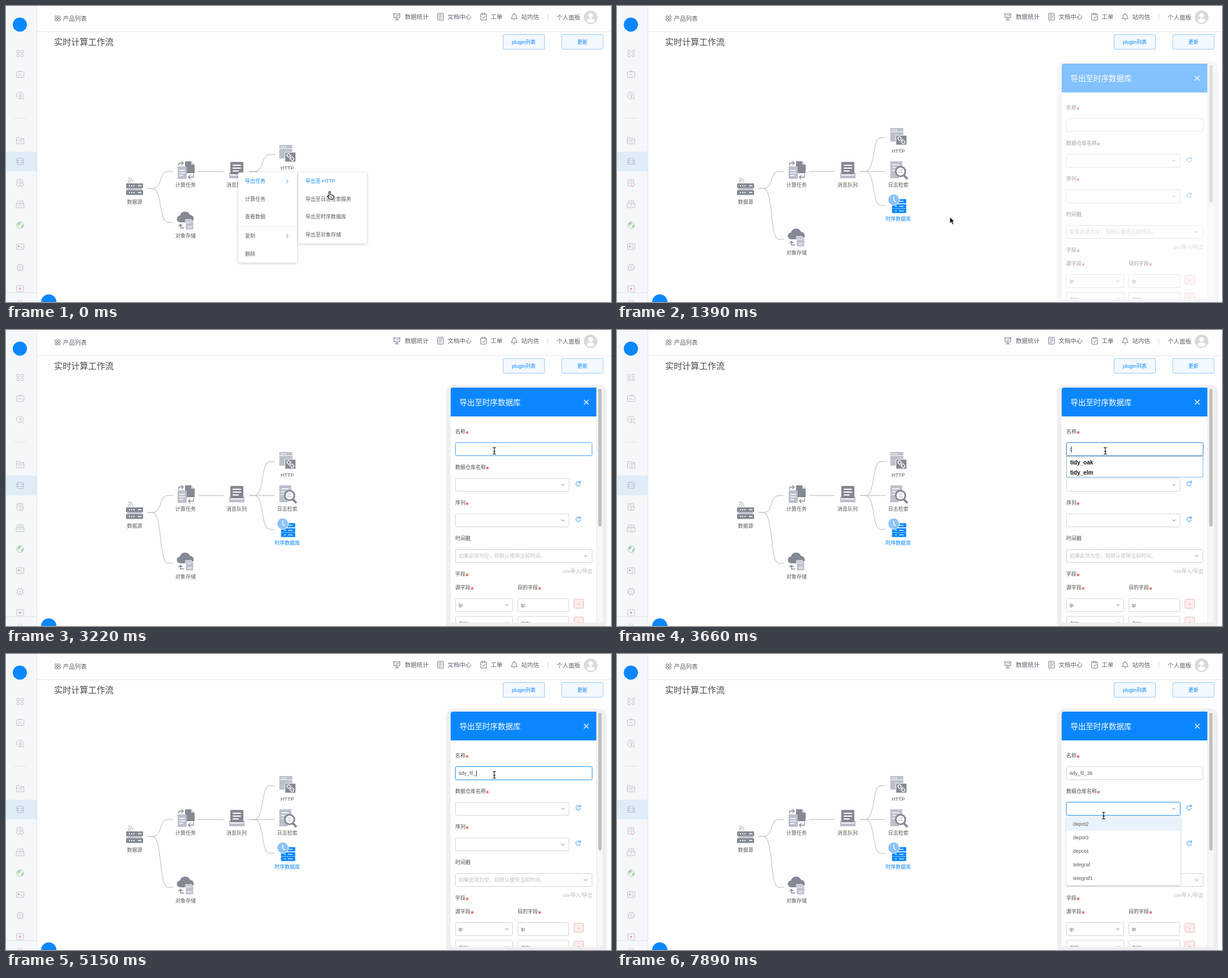
An HTML page for the animation above (8000 ms loop, 1068 by 524 pixels).

```html
<!DOCTYPE html>
<html lang="zh-CN">
<head>
<meta charset="utf-8">
<title>实时计算工作流</title>
<style>
html, body { margin: 0; width: 100%; height: 100%; overflow: hidden; background: #fefefe; }
svg { display: block; width: 100vw; height: 100vh; }
text { font-family: "Liberation Sans", "Noto Sans CJK SC", "Noto Sans CJK", sans-serif; white-space: pre; }
.pop { filter: drop-shadow(0 1px 2px rgba(0, 0, 0, .22)); }
.line { fill: none; stroke-linecap: round; stroke-linejoin: round; }
</style>
</head>
<body>
<svg id="stage" viewBox="0 0 1068 524"></svg>
<script>
const DARK = '#858993', LIGHT = '#bcc0cc', BLUE = '#0a87ff', HOVER = '#1b8fe8', ORANGE = '#eab596';
const NAME = 'tidy_fil_36';
const KEYS = [3520, 3670, 3820, 3960, 4260, 4560, 4700, 4850, 5150, 6050, 6200];
const $ = id => document.getElementById(id);

const text = (x, y, s, size = 9, fill = '#5c5c5c', extra = '') =>
  `<text x="${x}" y="${y + size * .36}" font-size="${size}" fill="${fill}" ${extra}>${s}</text>`;
const mid = (x, y, s, size, fill, extra = '') => text(x, y, s, size, fill, 'text-anchor="middle" ' + extra);
const rect = (x, y, w, h, fill, extra = '') =>
  `<rect x="${x}" y="${y}" width="${w}" height="${h}" fill="${fill}" ${extra}/>`;
const circle = (x, y, r, fill, extra = '') => `<circle cx="${x}" cy="${y}" r="${r}" fill="${fill}" ${extra}/>`;
const line = (d, stroke, w = 1) => `<path class="line" d="${d}" stroke="${stroke}" stroke-width="${w}"/>`;
const shape = (d, fill, extra = '') => `<path d="${d}" fill="${fill}" ${extra}/>`;
const group = (x, y, body, extra = '') => `<g transform="translate(${x} ${y})" ${extra}>${body}</g>`;
const layer = (id, body, extra = '') => `<g id="${id}" ${extra}>${body}</g>`;

// Workflow tree
const icons = {
  source: [-9, 3].map(y => rect(-15, y, 30, 8.5, DARK, 'rx="1"') +
      [-10, -6, -2].map(x => rect(x, y + 3.2, 2, 2, '#fff')).join('') + rect(6, y + 3.4, 6, 1.6, '#fff')).join('') +
    rect(-13, -.5, 26, 3, LIGHT) + circle(-10.5, -11.5, 1.3, LIGHT) +
    line('M-11-15q4 0 4.500 4.500M-11-18.500q7.500.500 8 8', LIGHT, 1.3),
  compute: shape('M-1-18h11l6 6V3H-1z', DARK) + shape('M10-18v6h6z', '#d9dbe1') +
    rect(-14, -9, 16, 22, LIGHT) + line('M-10.500-2h9M-10.500 2.500h9M-10.500 7h6', '#fff', 1.4) +
    line('M-12-11v-4h8m-3-3 3 3-3 3M14 5v5H5m3-3-3 3 3 3', DARK, 1.4),
  queue: rect(-11, -17, 23, 22, DARK, 'rx="1.5"') + line('M-6-11H7M-6-6H7M-6-1H3', '#fff', 2) +
    shape('M-13 2h2v5h23V2h2v10h-27z', LIGHT),
  http: rect(-14, -17, 23, 24, LIGHT, 'rx="1"') + line('M-14-10.500H9', '#fff') +
    [-11, -7.500, -4].map(x => rect(x, -14.5, 2, 2, '#fff')).join('') +
    rect(-4, -4, 19, 17, DARK, 'stroke="#fefefe" stroke-width="1"') +
    [-45, 135].map(a => `<g transform="translate(5.500 4.500) rotate(${a - 90})">` +
      line('M1.500-2.500H5a2.500 2.500 0 0 1 0 5H1M-1 0h3', '#fff', 1.5) + '</g>').join(''),
  log: shape('M-14-18H7V-5L0 12h-14z', LIGHT) + line('M-10-12H2M-10-7h5M-10-2h4', '#fff', 1.5) +
    circle(4, 0, 8.5, '#fefefe', `stroke="${DARK}" stroke-width="3"`) +
    line('M10 7l5 5', DARK, 4) + line('M1-2.500h6M1 1.500h6', LIGHT, 1.5),
  series: [-11, -2, 6].map(y => rect(-11, y, 25, 7.5, BLUE) + line(`M-5 ${y + 3.7}h2M2 ${y + 3.7}h7`, '#fff', 1.3)).join('') +
    circle(-8, -10, 10, '#8dc3f7', 'stroke="#fefefe"') + line('M-8-15v5.500l3 3', '#fff', 1.4),
  store: shape('M-9 0a6 6 0 0 1-1-12a9.500 9.500 0 0 1 18-1a6.500 6.500 0 0 1 0 13z', DARK) +
    shape('M0-5h10l4 4v14H0z', LIGHT, 'stroke="#fefefe"') + line('M3-2v3M6-2v3M9-2v3', '#fff', 1.2) +
    rect(3, 6, 8, 4, '#d9dbe1') + line('M-9 4v6h6M-12 6.500l3-3 3 3', DARK, 1.5)
};
const node = (x, y, icon, label, fill = '#5c5c5c') => group(x, y, icons[icon] + mid(0, 24, label, 9, fill));
const link = (x, y, toY) => line(`M${x} ${y}h8C${x + 27} ${y} ${x + 19} ${toY} ${x + 36} ${toY}h8`, '#cdcdcd', 1.4);
function tree(storeY, httpY, logY, seriesY) {
  const ends = [httpY, logY, seriesY].filter(Boolean);
  return link(250, 323, 293) + link(250, 323, storeY) + line('M340 293h44', '#cdcdcd', 1.4) +
    ends.map(y => link(430, 293, y)).join('') +
    node(227, 323, 'source', '数据源') + node(317, 293, 'compute', '计算任务') +
    node(407, 293, 'queue', '消息队列') + node(317, storeY, 'store', '对象存储') +
    node(496.5, httpY, 'http', 'HTTP') + node(496.5, logY, 'log', '日志检索') +
    (seriesY ? node(496.5, seriesY, 'series', '时序数据库', BLUE) : '');
}

// Page frame
const outline = (x, y, w, h, c = '#bcc1ca') => rect(x, y, w, h, 'none', `stroke="${c}" rx="1"`);
const sideIcons = {
  84: outline(-6, -5.5, 4.5, 4.5) + outline(1.5, -5.5, 4.5, 4.5) + outline(-6, 1.5, 4.5, 4.5) + circle(3.7, 3.7, 2.4, 'none', 'stroke="#bcc1ca"'),
  121: outline(-6.5, -4.5, 13, 10) + line('M-3 2l2-3 2 3M3 2h1M-2-6h4', '#bcc1ca'),
  159: circle(-.5, -.5, 6, 'none', 'stroke="#bcc1ca"') + circle(0, -1, 2, 'none', `stroke="${ORANGE}"`) + line('M0 1v3M4 4l3 3', ORANGE),
  238: line('M-6.500 5.500v-11h5l1 2h7v9zM-6.500-1h13M-3 2h6', '#bcc1ca'),
  275: outline(-5, -5.5, 11, 11) + line('M-7-2h5M-7 2h5M1-2h5M1 2h5', '#a4b1c1'),
  313: outline(-5.5, -6, 10, 12) + line('M-3-3h5M-3 0h3', '#bcc1ca') + circle(3, 3, 3, '#f5f7fa', `stroke="${ORANGE}"`),
  351: line('M-5-1v-5H5v5M-6.500-1h13v7h-13z', '#bcc1ca') + line('M-2 2h4M-2-3h4', ORANGE),
  388: circle(0, 0, 6, 'none', 'stroke="#a9c9ac"') + shape('M-5-2q3-4 6-3l-1 4-3 1 1 4zM2 0l4-1-2 5-2 1z', '#a5cfa8'),
  426: outline(-6.5, -5, 13, 10) + rect(-4, -2, 3, 3, '#ea9a9a') + line('M1-1h3M1 2h3', '#bcc1ca'),
  463: outline(-4.5, -4.5, 9, 9) + outline(-1.5, -1.5, 3, 3) + line('M-2-6.500v1M2-6.500v1M-2 5.500v1M2 5.500v1M-6.500-2h1M-6.500 2h1M5.500-2h1M5.500 2h1', '#bcc1ca'),
  500: outline(-6, -5, 12, 11) + shape('M-1.500-2l4 2.500-4 2.500z', '#e58b8b')
};
const sidebar = rect(0, 0, 54, 524, '#f5f7fa') + rect(0, 258, 54, 34.5, '#e0ecf8') +
  line('M54.500 0V524', '#e5e8ee') + line('M14 198.500H36M0 507.500H54', '#dfe3e9') +
  circle(24.5, 33, 12.5, BLUE) +
  Object.entries(sideIcons).map(([y, icon]) => group(25, +y, icon, y == 500 ? 'clip-path="url(#sideCut)"' : '')).join('') +
  line('M21 520l3 3.500-3 3.500M26 520l3 3.500-3 3.500', '#bcc1ca') + circle(75.5, 524, 13.5, BLUE);

const SLATE = '#6b7280';
const navIcons = [
  [690, line('M-6-5h12M-5-5v7H5v-7M0 2v3M-3 5.500h6M-2.500 0l2-2 1.500 1 2-2', SLATE)],
  [767, outline(-5, -6, 10, 12, SLATE) + line('M-2.500-3h5M-2.500 0h5M-2.500 3h3', SLATE)],
  [843, outline(-5, -5, 10, 11, SLATE) + line('M-2-6.500v3M2-6.500v3M-2 1l2 2 3-4', SLATE)],
  [897, line('M-5 3q1.500-1 1.500-4a3.500 4 0 0 1 7 0q0 3 1.500 4zM-1 5.500h2M0-6v1', SLATE)]
];
const button = (x, s) => rect(x, 50.5, 73, 26, '#f3f9ff', 'stroke="#9accfb" rx="1.5"') +
  mid(x + 36.5, 63.5, s, 9, BLUE, 'font-weight="500"');
const header = line('M55 45.500H1068', '#e7e8ea') +
  [[-4.5, -4.5], [.7, -4.5], [-4.5, .7], [.7, .7]].map(([x, y]) => outline(x + 91, y + 22, 3.7, 3.7, SLATE)).join('') +
  text(100.5, 22.5, '产品列表', 10.5, '#5d626d') +
  navIcons.map(([x, icon]) => group(x, 19, icon)).join('') +
  [[704, '数据统计'], [779.5, '文档中心'], [855.5, '工单'], [909.5, '站内信']].map(([x, s]) => text(x, 19, s, 10.5, '#5d626d')).join('') +
  line('M956.500 14v12', '#d9dce1') + text(972, 20, '个人面板', 10.5, '#5d626d') +
  circle(1032, 20, 12, '#d9d9d9') + circle(1032, 17, 4.2, '#fff') + shape('M1024.500 27q1-5 7.500-5t7.500 5q-7.500 5-15 0z', '#fff') +
  text(85, 64, '实时计算工作流', 15, '#4a4a4a') + button(877.5, 'plugin列表') + button(981, '更新');

// Context menus
const card = (x, y, w, h) => rect(x, y, w, h, '#fff', 'class="pop" rx="2"');
const menu = card(410, 294.5, 104, 160) + line('M410 390.500h104', '#e8e8e8') +
  [[310, '导出任务', HOVER], [342, '计算任务'], [373, '查看数据'], [407, '复制'], [438.5, '删除']].map(([y, s, c]) => text(422, y, s, 9, c)).join('') +
  line('M495 307.500l3 3-3 3', HOVER) + line('M495 404.500l3 3-3 3', '#666') +
  card(516, 294.5, 121, 126) +
  ['导出至 HTTP', '导出至日志检索服务', '导出至时序数据库', '导出至对象存储'].map((s, i) => text(528.5, 310 + 31.6 * i, s, 9, '#5c5c5c', `id="export${i}"`)).join('');

// Form panel
const label = (x, y, s, star = true) => text(x, y, s, 9, '#4d4d4d', 'font-weight="500"') +
  (star ? `<text x="${x + 9 * s.length + .5}" y="${y + 7.5}" font-size="13" font-weight="bold" fill="#f0483e">*</text>` : '');
const field = (x, y, w, extra = '') => rect(x + .5, y + .5, w - 1, 23, '#fff', `stroke="#d3d5da" rx="2" ${extra}`);
const chevron = (x, y) => line(`M${x - 2.5} ${y - 1.2}l2.500 2.500 2.500-2.500`, '#777');
const refresh = y => line(`M1013.500 ${y - 2}a4 4 0 1 0 .5 3M1014 ${y - 5}v3.200h-3.200`, HOVER);
const row = (y, s) => field(793, y, 102) + chevron(884, y + 12) + field(903, y, 91) +
  text(799, y + 12, s) + text(909, y + 12, s) +
  rect(1002.5, y + 1.5, 17, 16, '#fdecec', 'stroke="#f1bcbc" rx="2"') + mid(1011, y + 10, '-', 9, '#c66');
const panel = rect(777, 97, 284, 440, '#efeff0', 'rx="13" style="filter:blur(1px)"') +
  '<g clip-path="url(#panelCut)">' + rect(785, 102, 268, 416, '#fff') + rect(785, 102, 257.5, 51, BLUE) +
  rect(1042.5, 102, 10.5, 416, '#f8f8f8') + line('M1043 102V518', '#e6e6e6') + rect(1045.5, 104, 6, 244, '#bfbfbf', 'rx="3"') +
  text(800.5, 128, '导出至时序数据库', 13.5, '#fff') + line('M1020.500 124l7.500 7.500M1028 124l-7.500 7.500', '#fff', 1.2) +
  label(793, 180, '名称') + field(793, 199, 242, 'id="nameBox"') + text(799, 211, '', 9, '#5c5c5c', 'id="typed"') +
  label(793, 243, '数据仓库名称') + field(793, 262, 201.5, 'id="repoBox"') + layer('repoArrow', chevron(0, 0)) + refresh(272) +
  label(793, 306, '序列') + field(793, 325, 201.5) + chevron(983, 337) + refresh(335) +
  label(793, 369, '时间戳', false) + field(793, 388, 242) + text(799, 400, '如果此项为空，则默认使用当前时间。', 9, '#bdbfc4') + chevron(1023, 400) +
  text(1035, 426.5, 'csv导入/导出', 9, '#b5b7bb', 'text-anchor="end"') +
  label(793, 432, '字段') + label(793, 456, '源字段') + label(903, 456, '目的字段') + row(475, 'ip') + row(506.5, 'date') +
  layer('hints', rect(793.5, 223.5, 241, 37, '#fff', 'stroke="#8fb5dc"') +
    ['tidy_oak', 'tidy_elm'].map((s, i) => text(800, 234 + 18 * i, s, 10, '#111', 'font-weight="bold"')).join('')) +
  layer('options', card(793, 289, 201.5, 120) + rect(793, 289, 201.5, 24, '#eaf3fc') +
    ['depot2', 'depot3', 'depot4', 'telegraf', 'telegraf1'].map((s, i) => text(805, 301 + 24 * i, s)).join('')) +
  rect(0, 0, 1, 11, '#333', 'id="caret"') + '</g>';

const pointer = layer('mouse',
  layer('hand', shape('M-1 8V.500a1.300 1.300 0 0 1 2.600 0V5l4.800 1.300q1.600.500 1.300 2.200l-1 4.500h-6.200l-4.200-5q.600-1.800 2.700 0z', '#fff', 'stroke="#000" stroke-width="1.1"') +
    line('M2 8v3M4.200 8v3', '#000', .7)) +
  layer('arrow', shape('M0 0v11l2.600-2.300 1.900 4.300 2-.900-1.900-4.200H8z', '#000', 'stroke="#fff" stroke-width=".8"')) +
  layer('beam', line('M-2.500-6q2 0 2.500 1 .500-1 2.500-1M0-5V5M-2.500 6q2 0 2.500-1 .500 1 2.500 1M-1.500 1h3', '#111', 1.2)));

$('stage').innerHTML = `<clipPath id="panelCut">${rect(785, 102, 268, 416, '#000', 'rx="4"')}</clipPath>
  <clipPath id="sideCut">${rect(-10, -10, 20, 16.5, '#000')}</clipPath>` + rect(0, 0, 1068, 524, '#fefefe') +
  layer('treeBefore', tree(383, 263, 323)) + layer('treeAfter', tree(413, 233, 293, 353)) +
  sidebar + header + layer('menu', menu) + layer('panel', panel) + pointer;

// [first step, last step, step count, x, y]
const MOVES = [
  [150, 800, 5, 589, 374], [1240, 1860, 5, 577, 372], [2190, 3220, 8, 862, 214],
  [6500, 7240, 6, 864, 283], [7560, 7890, 3, 859, 286]
];
function mouseAt(t) {
  let x = 571, y = 329;
  for (const [from, to, count, toX, toY] of MOVES) {
    if (t < from) break;
    const k = Math.min(count, Math.floor((t - from) / (to - from) * (count - 1) + 1.001)) / count;
    const ease = k * k * (3 - 2 * k);
    x += (toX - x) * ease;
    y += (toY - y) * ease;
  }
  return [x, y];
}

const show = (id, on) => $(id).style.display = on ? '' : 'none';
const between = (t, a, b) => t >= a && t < b;
function outlineField(id, color, glow) {
  $(id).setAttribute('stroke', color);
  $(id).style.filter = glow ? 'drop-shadow(0 0 1px rgba(30,145,255,.65))' : '';
}

function render(t) {
  const [x, y] = mouseAt(t);
  const added = t >= 1240;
  show('menu', !added);
  show('treeBefore', !added);
  show('treeAfter', added);
  $('panel').style.opacity = t < 1390 ? 0 : t < 1540 ? .5 : 1;

  const hover = y < 333 ? 0 : y < 358 ? 1 : 2;
  for (let i = 0; i < 4; i++) $('export' + i).setAttribute('fill', i === hover ? HOVER : '#5c5c5c');

  const inName = x > 793 && between(y, 199, 224);
  const beam = inName || (t > 6500 && y > 262);
  $('mouse').setAttribute('transform', `translate(${x} ${y})`);
  show('hand', t < 1100);
  show('beam', beam);
  show('arrow', t >= 1100 && !beam);

  const naming = between(t, 3370, 7090), open = t >= 7240, hinting = between(t, 3520, 4560);
  outlineField('nameBox', hinting ? '#4f8fd3' : naming || inName ? '#3fa3f5' : '#d3d5da', naming);
  outlineField('repoBox', t >= 7090 ? '#3fa3f5' : '#d3d5da', t >= 7090);
  $('typed').textContent = NAME.slice(0, KEYS.filter(k => k <= t).length);
  show('hints', hinting);
  show('options', open);
  $('repoArrow').setAttribute('transform', `translate(983 274) scale(1 ${open ? -1 : 1})`);

  const caretX = naming ? 799.5 + $('typed').getComputedTextLength() : 799;
  show('caret', (naming && !between(t, 5600, 6050)) || between(t, 7240, 7725));
  $('caret').setAttribute('x', Math.round(caretX));
  $('caret').setAttribute('y', naming ? 206 : 269);
}

let start;
function tick(now) {
  start ??= now;
  render((now - start) % 8000);
  requestAnimationFrame(tick);
}
render(0);
requestAnimationFrame(tick);
</script>
</body>
</html>
```
